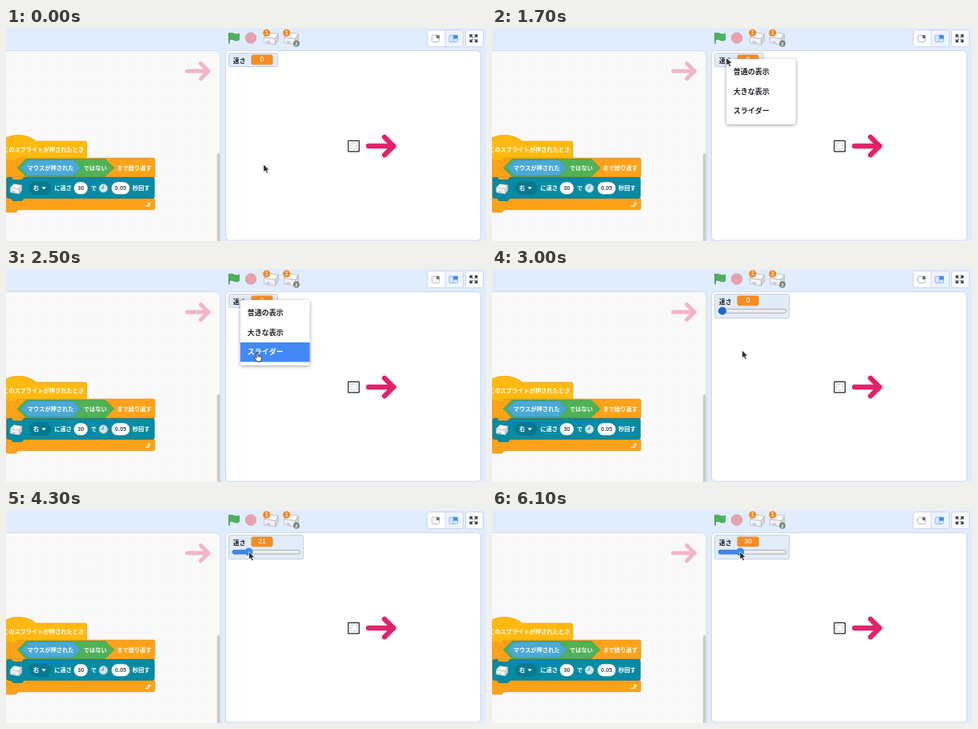
Recreate the animation shown at these times as an HTML page with a canvas. Size 600x267 px, loop 8100 ms.

```html
<!DOCTYPE html>
<html lang="ja">
<head>
<meta charset="utf-8">
<title>スライダーの操作</title>
<style>
html, body { margin: 0; width: 100%; height: 100%; overflow: hidden; background: #e1edfe; }
canvas { display: block; width: 100vw; height: 100vh; }
</style>
</head>
<body>
<canvas id="stage"></canvas>
<script>
const W = 600, H = 267, LOOP = 8100, STEP = 100;
const FONT = '"Noto Sans CJK JP", "Noto Sans CJK", sans-serif';
const LATIN = '"Liberation Sans", Arial, sans-serif';
const canvas = document.getElementById('stage');
const g = canvas.getContext('2d');

const lerp = (a, b, p) => a + (b - a) * p;
const smooth = p => p * p * (3 - 2 * p);

// Progress of a move whose first visible step is at `from` and last at `to`.
function progress(t, from, to) {
  const p = (t - from + STEP) / (to - from + STEP);
  return Math.max(0, Math.min(1, p));
}

function paint(fill, stroke, width = 1) {
  if (fill) { g.fillStyle = fill; g.fill(); }
  if (stroke) { g.strokeStyle = stroke; g.lineWidth = width; g.stroke(); }
}
function box(x, y, w, h, r, fill, stroke, width) {
  g.beginPath();
  g.roundRect(x, y, w, h, r);
  paint(fill, stroke, width);
}
function disc(x, y, r, fill, stroke, width) {
  g.beginPath();
  g.arc(x, y, r, 0, Math.PI * 2);
  paint(fill, stroke, width);
}
function poly(points, fill, stroke, width, open) {
  g.beginPath();
  for (let i = 0; i < points.length; i += 2) g.lineTo(points[i], points[i + 1]);
  if (!open) g.closePath();
  paint(fill, stroke, width);
}
function text(str, x, y, size, color, { align = 'left', weight = 700, font = FONT } = {}) {
  g.font = `${weight} ${size}px ${font}`;
  g.textAlign = align;
  g.textBaseline = 'alphabetic';
  g.fillStyle = color;
  g.fillText(str, x, y);
}

function arrow(x1, x2, y, head, width, color) {
  g.lineCap = g.lineJoin = 'round';
  const r = width / 2, tip = x2 - r;
  poly([x1 + r, y, tip, y], null, color, width, true);
  poly([tip - head, y - head, tip, y, tip - head, y + head], null, color, width, true);
  g.lineCap = 'butt';
  g.lineJoin = 'miter';
}

function cube(x, y, s) {
  g.save();
  g.translate(x, y);
  g.scale(s, s);
  g.lineJoin = 'round';
  const line = '#b4b8bf';
  poly([-9, -1.5, -3.5, -7.5, 9, -5.5, 5, 0.5], '#fdfdfd', line, 0.8);
  poly([-9, -1.5, 5, 0.5, 5, 8, -9, 5.5], '#f1f2f4', line, 0.8);
  poly([5, 0.5, 9, -5.5, 9, 2.5, 5, 8], '#d3d6db', line, 0.8);
  poly([-6, 3, -1, 3.8, -1, 6.2, -6, 5.4], '#c9cdd3');
  g.restore();
}

function cubeButton(x, y, badge) {
  cube(x, y, 1);
  disc(x - 5.8, y - 7, 4.6, '#f5851f');
  text(badge, x - 5.8, y - 4.7, 6.5, '#fff', { align: 'center', font: LATIN });
}

function toolbar() {
  // Flag
  g.lineCap = 'round';
  poly([279, 6.5, 279, 19], null, '#3f9a4c', 1.6, true);
  g.beginPath();
  g.moveTo(279, 7);
  g.bezierCurveTo(283, 4, 286, 10, 291.5, 7);
  g.lineTo(291.5, 15);
  g.bezierCurveTo(286, 18, 283, 12, 279, 15);
  g.closePath();
  paint('#4cb35a', '#3f9a4c', 0.8);
  g.lineCap = 'butt';

  // Stop sign
  const oct = [];
  for (let i = 0; i < 8; i++) {
    const a = (i + 0.5) * Math.PI / 4;
    oct.push(306 + 7 * Math.cos(a), 12.5 + 7 * Math.sin(a));
  }
  poly(oct, '#e5a3ad', '#dc929e', 0.8);

  cubeButton(331.5, 13, '1');
  cubeButton(356.5, 13, '1');
  disc(363, 19.5, 3.9, '#788578');
  text('2', 363, 21.6, 6, '#fff', { align: 'center', font: LATIN });

  // Layout buttons
  const edge = '#cbd6e6';
  box(526.5, 2.5, 45, 21, 3, '#fff', edge);
  box(549, 3, 22, 20, [0, 3, 3, 0], '#edf4ff');
  poly([549, 3, 549, 23], null, edge, 1, true);
  box(532.5, 9, 9, 8.5, 1, '#fff', '#b3b0b2', 0.9);
  box(538, 9, 3.8, 4, 0, '#77757f');
  box(554, 9, 10.5, 8.5, 1, '#dbe9ff', '#86b4f8', 0.9);
  box(559, 9, 5.5, 4.5, 0, '#3d89f5');
  poly([559, 9, 559, 17.5], null, '#86b4f8', 0.8, true);

  // Full screen
  box(574.5, 2.5, 22, 21, 3, '#fff', edge);
  for (const sx of [-1, 1]) for (const sy of [-1, 1]) {
    const x = 584.5 + sx * 4.3, y = 13 + sy * 4.3;
    poly([584.5 + sx * 1.3, 13 + sy * 1.3, x, y], null, '#363a48', 1.4, true);
    poly([x - sx * 3, y, x, y, x, y - sy * 3], null, '#363a48', 1.4, true);
  }
}

// Connector below a block
function tooth(x, y, fill, stroke) {
  const shape = [x + 5.5, y - 0.4, x + 7.6, y + 3, x + 19, y + 3, x + 21.5, y - 0.4];
  poly(shape, fill, stroke, 0.7, true);
}
function hex(x, y, w, h, fill, stroke) {
  const d = h / 2;
  poly([x, y + d, x + d, y, x + w - d, y, x + w, y + d, x + w - d, y + h, x + d, y + h],
    fill, stroke, 0.7);
}

function blocks() {
  const left = -6.5;
  const yellow = '#ffb910', yellowEdge = '#e3a008';
  const orange = '#ffa21a', orangeEdge = '#e08f16';
  const teal = '#078ba4', tealEdge = '#067186';
  const label = (str, x, y) => text(str, x, y, 7.25, '#fff');

  // Loop
  box(left, 163, 192.5, 24.5, 1.8, orange, orangeEdge, 0.7);
  box(left, 213.5, 192.5, 14.2, 1.8, orange, orangeEdge, 0.7);
  box(left, 180, 7.5, 40, 0, orange);
  tooth(left, 228, orange, orangeEdge);

  // Hat
  g.beginPath();
  g.moveTo(left, 142);
  g.bezierCurveTo(5, 131.8, 26, 131.8, 37.5, 142);
  g.lineTo(99, 142);
  g.quadraticCurveTo(101, 142, 101, 144);
  g.lineTo(101, 161);
  g.quadraticCurveTo(101, 163, 99, 163);
  g.lineTo(left, 163);
  g.closePath();
  paint(yellow, yellowEdge, 0.7);
  tooth(left, 163, yellow, yellowEdge);
  text('このスプライトが押されたとき', 97.5, 155.4, 7.25, '#fff', { align: 'right' });

  hex(14, 164.3, 121, 22, '#50b155', '#3f9c46');
  hex(18.5, 165.3, 75, 20, '#4aa9d6', '#3a8fbd');
  label('マウスが押された', 26.8, 178);
  label('ではない', 97, 178);
  label('まで繰り返す', 138.5, 178);

  // Turn command
  box(1, 187.3, 184.3, 26, 1.8, teal, tealEdge, 0.8);
  tooth(1, 187.5, orange, tealEdge);
  tooth(1, 213.5, teal, tealEdge);
  cube(12.5, 201.5, 0.8);
  box(29.5, 192.8, 26.5, 16, 8, '#07788f', tealEdge, 0.7);
  label('右', 34, 203.4);
  poly([44.5, 199.3, 50, 199.3, 47.2, 202.4], '#fff');
  label('に速さ', 60.5, 203.4);
  box(84.5, 192.8, 18, 16, 8, '#fff', tealEdge, 0.7);
  text('30', 93.5, 203.4, 7.3, '#4b5060', { align: 'center', font: LATIN });
  label('で', 106, 203.4);
  disc(121.7, 200.8, 5.4, '#d3e6ea', '#7fb7c3', 0.9);
  poly([121.7, 197.3, 121.7, 201, 118.8, 201], null, '#45808d', 0.9, true);
  box(131.5, 192.8, 23.5, 16, 8, '#fff', tealEdge, 0.7);
  text('0.05', 143.2, 203.4, 7.3, '#4b5060', { align: 'center', font: LATIN });
  label('秒回す', 158, 203.4);

  // Loop sign
  g.beginPath();
  g.moveTo(174, 223.4);
  g.lineTo(177, 223.4);
  g.quadraticCurveTo(179, 223.2, 179, 220.5);
  paint(null, '#fff', 1.2);
  poly([176.7, 220.9, 179, 218, 181.3, 220.9], '#fff');
}

function workspace() {
  box(-10, 28.5, 278, 260, 7, '#f9f9f9', '#d3dbe7');
  g.fillStyle = '#e2e2e4';
  for (let x = 11; x < 262; x += 18.2)
    for (let y = 36; y < H; y += 18.2) g.fillRect(x, y, 1, 1);
  arrow(224, 255.5, 54, 9.5, 5, '#f2b3cb');
  blocks();
  box(263.7, 157, 3.8, 130, 2, '#cbcbcd');
}

function sprites() {
  box(274.5, 28.5, 319, 237.7, 5, '#fff', '#cfd8e6');
  box(427.8, 141.3, 13.6, 13.6, 0.5, '#fff', '#222', 1.2);
  g.setLineDash([2, 1.6]);
  box(430.6, 144.1, 8, 8, 2, '#fafafa', '#9aa2b4', 0.9);
  g.setLineDash([]);
  arrow(450, 487.5, 148, 11.2, 6.3, '#e0226b');
}

function monitor(value, slider, held) {
  box(278.5, 31.5, slider ? 93 : 61, slider ? 30 : 17, 2, '#e2ecf9', '#c2cfdf');
  text('速さ', 283.8, 43.6, 7.9, '#1f222b');
  box(306.8, 33.8, 26.4, 12, 2, '#f78d22', '#dd7a18', 0.5);
  text(value, 320, slider ? 41.6 : 42.2, 9, '#fff', { align: 'center', weight: 400, font: LATIN });
  if (!slider) return;
  const x = 288 + value * 0.74;
  box(283, 50.3, 84.5, 4.8, 2.4, '#eff0f2', '#9aa2ae', 0.9);
  box(283, 50.3, x - 283, 4.8, 2.4, '#3a86ee', '#2b6fd0', 0.6);
  disc(x, 52.5, 5, held ? '#3c88f2' : '#1f68c8');
}

function menu(cursorY) {
  const left = 293, width = 86.7, row = 24.5;
  g.save();
  g.shadowColor = 'rgba(0,0,0,.4)';
  g.shadowBlur = 4;
  g.shadowOffsetY = 1;
  box(left, 38.8, width, 82, 2, '#fff');
  g.restore();
  ['普通の表示', '大きな表示', 'スライダー'].forEach((item, i) => {
    const top = 43 + i * row;
    const hot = cursorY >= top && cursorY < top + row;
    if (hot) box(left, top, width, row, 0, '#4289f7');
    text(item, 301.8, top + 15.2, 9, hot ? '#fff' : '#222429');
  });
}

function pointer(x, y) {
  g.save();
  g.translate(x, y);
  g.lineJoin = 'round';
  poly([0, 0, 0, 9.6, 2.2, 7.6, 3.8, 11, 5.5, 10.2, 4, 7, 7, 6.8], '#333', '#fff', 1);
  poly([0.2, 0.6, 0.2, 8.8, 2.3, 7, 3.9, 10.4, 5, 9.9, 3.4, 6.5, 6.2, 6.4], '#333');
  g.restore();
}

function hand(x, y) {
  g.save();
  g.translate(x, y);
  g.lineJoin = 'round';
  poly([-1, 0, 0.8, 0, 1, 3.8, 5, 4.8, 5.6, 6.5, 4.6, 11, -0.4, 11, -3.8, 6.2, -2.6, 5.4, -1, 6.8],
    '#fff', '#333', 1);
  poly([1, 3.8, 1, 6], null, '#555', 0.7, true);
  poly([3, 4.4, 3, 6.2], null, '#555', 0.7, true);
  g.restore();
}

function cursorAt(t, value) {
  if (t < 2200) {
    const p = smooth(progress(t, 500, 1000));
    return [lerp(322, 293, p), lerp(171, 37.5, p)];
  }
  if (t < 3000) {
    const p = smooth(progress(t, 2200, 2500));
    return [lerp(293, 314, p), lerp(37.5, 105, p)];
  }
  const p = smooth(progress(t, 3000, 3600));
  return [lerp(314, 289, p) + value * 0.7, lerp(105, 52.5, p)];
}

function speedAt(t) {
  return Math.round(21 * smooth(progress(t, 3900, 4300))
    + 7 * smooth(progress(t, 4600, 4900))
    + 2 * progress(t, 5200, 5300));
}

function draw(now) {
  const t = Math.floor(now % LOOP / STEP) * STEP;
  const ratio = window.devicePixelRatio || 1;
  const w = Math.round(innerWidth * ratio), h = Math.round(innerHeight * ratio);
  if (canvas.width !== w || canvas.height !== h) {
    canvas.width = w;
    canvas.height = h;
  }
  g.setTransform(w / W, 0, 0, h / H, 0, 0);
  g.fillStyle = '#e1edfe';
  g.fillRect(0, 0, W, H);

  const value = speedAt(t);
  const [x, y] = cursorAt(t, value);
  const open = t >= 1500 && t < 3000;
  toolbar();
  workspace();
  sprites();
  monitor(value, t >= 3000, t >= 3900);
  if (open) menu(y);
  if (open && y > 43) hand(x, y);
  else pointer(x, y);
}

const start = performance.now();
function tick() {
  draw(performance.now() - start);
  requestAnimationFrame(tick);
}
tick();
</script>
</body>
</html>
```
